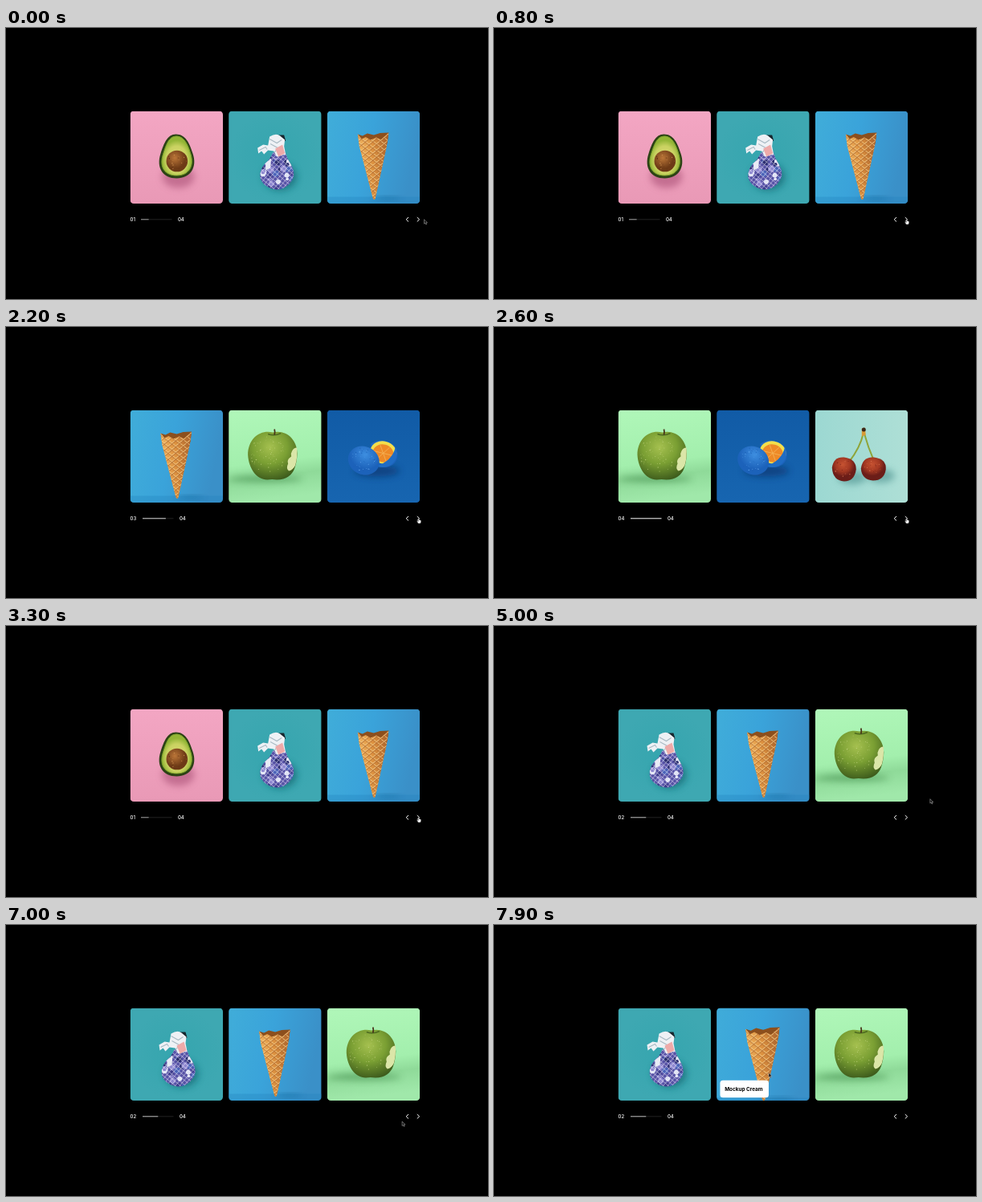
Recreate the animation shown at these times as an HTML page. Size 600x338 px, loop 8000 ms.

```html
<!DOCTYPE html>
<html lang="en">
<head>
<meta charset="utf-8">
<title>Food carousel</title>
<style>
  html, body { margin: 0; width: 100%; height: 100%; overflow: hidden; background: #000; }
  svg { display: block; width: 600px; height: 338px; }
  .count { font: 500 6px Inter, sans-serif; fill: #fff; }
  .label text { font: 700 6.4px Inter, sans-serif; fill: #000; }
</style>
</head>
<body>
<svg viewBox="0 0 600 338">
  <defs>
    <clipPath id="view"><rect x="154.5" y="103.5" width="360.8" height="115.5"/></clipPath>
    <clipPath id="card"><rect width="115.5" height="115.5" rx="4.5"/></clipPath>
    <clipPath id="bag"><path d="M55 52L70 50Q72 58 77 66Q84 78 79 86Q72 98 59 98Q42 95 39 82Q39 72 46 65Q52 60 55 52Z"/></clipPath>
    <filter id="blur" x="-50%" y="-100%" width="200%" height="300%"><feGaussianBlur stdDeviation="4"/></filter>
    <pattern id="net" width="4.2" height="4.2" patternUnits="userSpaceOnUse" patternTransform="rotate(40)">
      <path d="M0 0H4.2M0 0V4.2" stroke="#f3f2ff" stroke-width=".8"/>
    </pattern>
    <pattern id="waffle" width="6" height="6" patternUnits="userSpaceOnUse" patternTransform="rotate(38) skewX(-12)">
      <path d="M0 0H6M0 0V6" stroke="#fad590" stroke-width="2"/>
      <path d="M0 1.5H6M1.5 0V6" stroke="#a9612a" stroke-width=".8"/>
    </pattern>
    <linearGradient id="pink" x2="0" y2="1"><stop stop-color="#f3a6c3"/><stop offset="1" stop-color="#e999b6"/></linearGradient>
    <radialGradient id="teal"><stop stop-color="#35a5ae"/><stop offset="1" stop-color="#3ea8b2"/></radialGradient>
    <linearGradient id="sky" y2=".2"><stop stop-color="#40add9"/><stop offset=".5" stop-color="#3aa3da"/><stop offset="1" stop-color="#3a90c8"/></linearGradient>
    <linearGradient id="mint" x2=".12" y2="1"><stop stop-color="#b0f7b9"/><stop offset=".6" stop-color="#a3efad"/><stop offset=".76" stop-color="#8fda99"/><stop offset="1" stop-color="#a0e8aa"/></linearGradient>
    <linearGradient id="navy" x2="0" y2="1"><stop stop-color="#115ba6"/><stop offset="1" stop-color="#1765b0"/></linearGradient>
    <linearGradient id="aqua"><stop stop-color="#9cd8d2"/><stop offset="1" stop-color="#aedfd6"/></linearGradient>
    <radialGradient id="flesh" cy=".6"><stop stop-color="#e3dc78"/><stop offset=".7" stop-color="#c9d261"/><stop offset="1" stop-color="#93b536"/></radialGradient>
    <radialGradient id="seed" cx=".4" cy=".35"><stop stop-color="#bb7638"/><stop offset="1" stop-color="#6d3a16"/></radialGradient>
    <linearGradient id="cone"><stop stop-color="#f0b35e"/><stop offset=".5" stop-color="#dc9140"/><stop offset="1" stop-color="#a9612a"/></linearGradient>
    <radialGradient id="apple" cx=".45" cy=".32" r=".7"><stop stop-color="#a5c04f"/><stop offset=".5" stop-color="#7a9f33"/><stop offset="1" stop-color="#3e5c1c"/></radialGradient>
    <radialGradient id="peel" cx=".45" cy=".3"><stop stop-color="#3d8ee0"/><stop offset="1" stop-color="#1c62ba"/></radialGradient>
    <radialGradient id="cherry" cx=".45" cy=".3"><stop stop-color="#c65231"/><stop offset=".6" stop-color="#a33822"/><stop offset="1" stop-color="#6b1d18"/></radialGradient>
  </defs>

  <g clip-path="url(#view)"><g id="track"></g></g>

  <text id="page" class="count" x="154.6" y="241"></text>
  <g id="bar">
    <path d="M0 238.8H38.5" stroke="#222"/>
    <path id="fill" d="M0 238.8H38.5" stroke="#eee"/>
    <text class="count" x="46" y="241">04</text>
  </g>
  <path d="M501 236.1l-2.8 2.7 2.8 2.7M511.800 236.1l2.8 2.7-2.8 2.7" fill="none" stroke="#fff"/>

  <g id="cursor">
    <path id="arrow" d="M0 .5V5.9L1.3 4.8L2.2 6.8L3.1 6.4L2.3 4.4H4Z" fill="#111" stroke="#bbb" stroke-width=".5"/>
    <path id="hand" d="M-.6 1.2Q0 .4.6 1.2V3L2.8 3.6V5.600L2 7.400H-.7L-2.2 4.800L-1.6 4.200L-.6 5Z" fill="#fff" stroke="#333" stroke-width=".4"/>
  </g>
</svg>
<script>
const $ = id => document.getElementById(id);
const PITCH = 122.65;

let seed = 7;
const random = () => (seed = seed * 16807 % 2147483647) / 2147483647;

// Small dots scattered evenly over a disc
function speckle(count, cx, cy, radius, size, colors) {
  return Array.from({ length: count }, (_, i) => {
    const a = random() * 2 * Math.PI, r = Math.sqrt(random()) * radius;
    return `<circle cx="${cx + r * Math.cos(a)}" cy="${cy + r * Math.sin(a)}" r="${size * (.5 + random())}" fill="${colors[i % colors.length]}"/>`;
  }).join('');
}
const shadow = (cx, cy, rx, ry, color, opacity) =>
  `<ellipse cx="${cx}" cy="${cy}" rx="${rx}" ry="${ry}" fill="${color}" opacity="${opacity}" filter="url(#blur)"/>`;

const avocado = shadow(60, 82, 20, 14, '#b45c80', .7) + `
  <path d="M57 29C46 29 42 41 38 53C32 71 41 84 58 84C75 84 84 70 78 53C74 40 69 29 57 29Z" fill="#2c4215"/>
  <path d="M57 31.5C48 32 45 42 41 54C36 70 43 80.5 58 80.5C73 80.5 80 69 75.5 54C72 42 67 31 57 31.5Z" fill="url(#flesh)" stroke="#7fa52c"/>
  <circle cx="58.3" cy="62.5" r="13.3" fill="url(#seed)"/>` +
  speckle(20, 58.3, 62.5, 12, .5, ['#c98a4a', '#5d3010']);

const netBag = shadow(64, 82, 21, 17, '#176a75', .75) + `
  <path d="M62 30L69 30L71 37L64 40Z" fill="#17252d"/>
  <g clip-path="url(#bag)"><rect x="36" y="48" width="50" height="54" fill="#5752a6"/>
    ${speckle(46, 60, 78, 23, 2.8, ['#3d3b8c', '#8d86cf', '#2a2d70', '#dfe3f4', '#4a63b8'])}
    <rect x="36" y="48" width="50" height="54" fill="url(#net)"/></g>
  <path d="M51 32Q59 27 64 31L70 36L69 44L71 54L60 57L56 50L49 49L44 54L41 50L37 53L36 46L43 42L49 43Z" fill="#eef1f5"/>
  <path d="M38 49L46 45L48 48M51 35L60 40L66 36M52 41L61 46L57 52" fill="none" stroke="#a9bac4" stroke-width="1.1"/>
  <path d="M58 47L67 42L70 53L62 57Z" fill="#eeaaa9"/>
  <path d="M46 65L53 59L52 71L46 74Z" fill="#e9ebf6"/>`;

const coneShape = 'M38 29L43 35L48 32.5L54 36L61 33L67 35.5L72 31L76.5 27L74.5 42L60 109Q58.5 112 57 109L40 44Z';
const iceCone = `<rect x="-10" y="107" width="136" height="20" fill="#1f7fbb" opacity=".3"/>` +
  shadow(75, 109, 17, 1.5, '#0d4f80', .6) + `
  <path d="M38 29L44 31L50 28L58 30L66 27.5L76.5 27L75 40Q57 46 40 40Z" fill="#8c4f1d"/>
  <path d="${coneShape}" fill="url(#cone)"/>
  <path d="${coneShape}" fill="url(#waffle)" opacity=".75"/>`;

const apple = shadow(46, 86, 46, 4, '#3f8a48', .6) + `
  <path d="M55 28C40 24 24 35 24 56C25 73 35 87 48 87Q54 86 60 87C72 87 79 81 82 73Q85 65 85.500 54C85 36 71 24 55 28Z" fill="url(#apple)"/>
  ${speckle(75, 49, 56, 23, .4, ['#cad98a', '#aec566'])}
  <path d="M85 47Q81 47 79 51Q77 54 78 58Q72 62 74 67Q71 73 75 76Q80 75 83 69Q86 59 85 47Z" fill="#dbe6a8"/>
  <path d="M49 30Q57 33 65 29" fill="none" stroke="#4c6a20" stroke-width="1.4"/>
  <path d="M57 31Q58 27 57 24" fill="none" stroke="#49351b" stroke-width="1.8"/>`;

const orange = shadow(62, 76, 28, 7, '#08366e', .7) + `
  <path d="M54 42Q70 33 84 45Q92 59 82 68Q71 76 58 66Z" fill="url(#peel)"/>
  <g transform="rotate(14 70 53)"><ellipse cx="70" cy="53" rx="16.5" ry="14" fill="#f3df4b"/>
    <ellipse cx="70" cy="54" rx="13" ry="11" fill="#ee8a27"/>
    <path d="M58 54H82M64 45L76 63M76 45L64 63" stroke="#f5b257" stroke-width=".8"/></g>
  <path d="M85 46Q90 60 80 68Q72 74 61 70Q81 64 85 46Z" fill="#1f6cc4"/>
  <ellipse cx="45.5" cy="63" rx="20" ry="17.5" transform="rotate(28 45.5 63)" fill="url(#peel)"/>` +
  speckle(55, 45, 62, 15, .45, ['#66aaf0', '#1c5fb4']);

const cherries = shadow(46, 84, 18, 9, '#4b908d', .6) + shadow(82, 82, 17, 9, '#4b908d', .6) + `
  <path d="M60 29Q56 47 42 65M61 29Q66 47 73 63" fill="none" stroke="#8fa53a" stroke-width="2"/>
  <path d="M58 23L62 22L63 31L58 33Z" fill="#d89a35"/><circle cx="60.5" cy="24.5" r="2.5" fill="#3a2618"/>
  <path d="M21 72Q23 58 36 59Q51 61 51 74Q49 89 36 89Q22 88 21 72Z" fill="url(#cherry)"/>
  <path d="M57 73Q59 58 73 59Q89 61 88 74Q86 88 72 88Q58 87 57 73Z" fill="url(#cherry)"/>` +
  speckle(24, 36, 74, 12, .5, ['#dc7650', '#7d2419']) + speckle(24, 72, 74, 12, .5, ['#dc7650', '#7d2419']);

const cards = [
  ['pink', avocado], ['teal', netBag], ['sky', iceCone, 'Mockup Cream'],
  ['mint', apple, 'Delicious Apple'], ['navy', orange], ['aqua', cherries]
];
$('track').innerHTML = cards.map(([fill, art, title], i) => `
  <g transform="translate(${154.5 + i * PITCH} 103.5)">
    <g clip-path="url(#card)"><g class="pic"><rect width="115.5" height="115.5" fill="url(#${fill})"/>${art}</g></g>
    ${title ? `<g class="label"><rect x="4.3" y="90.3" width="60.5" height="21.5" rx="3.5" fill="#fff"/><text x="10" y="103.2">${title}</text></g>` : ''}
  </g>`).join('');

const pics = document.querySelectorAll('.pic');
const labels = document.querySelectorAll('.label');

const ease = p => p * p * (3 - 2 * p);
const ramp = (t, from, to) => ease(Math.min(1, Math.max(0, (t - from) / (to - from))));

// [click time, page shown after it]
const clicks = [[1200, 2], [1700, 3], [2250, 4], [2950, 1], [3710, 2]];
// [time, x, y] of the pointer tip
const path = [
  [100, 520.5, 238.3], [700, 513.8, 237.6], [4350, 513.8, 237.6], [4700, 543, 215.3], [4980, 543, 215.3],
  [5600, 487.3, 182], [6350, 487.3, 182], [6750, 533, 226], [7050, 490, 246], [7300, 420, 246],
  [7550, 365, 214], [7850, 342, 184]
];

function pointer(t) {
  const i = path.findIndex(p => p[0] > t);
  if (i === 0) return path[0].slice(1);
  if (i < 0) return path.at(-1).slice(1);
  const [a, b] = [path[i - 1], path[i]], p = ramp(t, a[0], b[0]);
  return [a[1] + (b[1] - a[1]) * p, a[2] + (b[2] - a[2]) * p];
}

function hover(card, label, amount) {
  const s = 1 + .1 * amount;
  pics[card].setAttribute('transform', `translate(57.75 57.75) scale(${s}) translate(-57.75 -57.75)`);
  labels[label].setAttribute('opacity', amount);
  labels[label].setAttribute('transform', `translate(0 ${8 * (1 - amount)})`);
}

function draw(t) {
  let page = 1, position = 1;
  for (const [start, next] of clicks) {
    if (t < start) break;
    position = page + (next - page) * ramp(t, start, start + 300);
    page = next;
  }
  $('track').setAttribute('transform', `translate(${(1 - position) * PITCH} 0)`);
  $('page').textContent = '0' + page;
  $('bar').setAttribute('transform', `translate(${page === 1 ? 168 : 170} 0)`);
  $('fill').setAttribute('transform', `scale(${position / 4} 1)`);

  hover(2, 0, ramp(t, 7480, 7880));
  hover(3, 1, ramp(t, 5280, 5780) - ramp(t, 6570, 7000));

  const [x, y] = pointer(t);
  const onButton = Math.abs(x - 513.8) < 3.5 && Math.abs(y - 238) < 4;
  $('cursor').setAttribute('transform', `translate(${x} ${y})`);
  $('arrow').setAttribute('visibility', onButton ? 'hidden' : 'visible');
  $('hand').setAttribute('visibility', onButton ? 'visible' : 'hidden');
}

const began = performance.now();
function tick() {
  draw((performance.now() - began) % 8000);
  requestAnimationFrame(tick);
}
tick();
</script>
</body>
</html>
```
